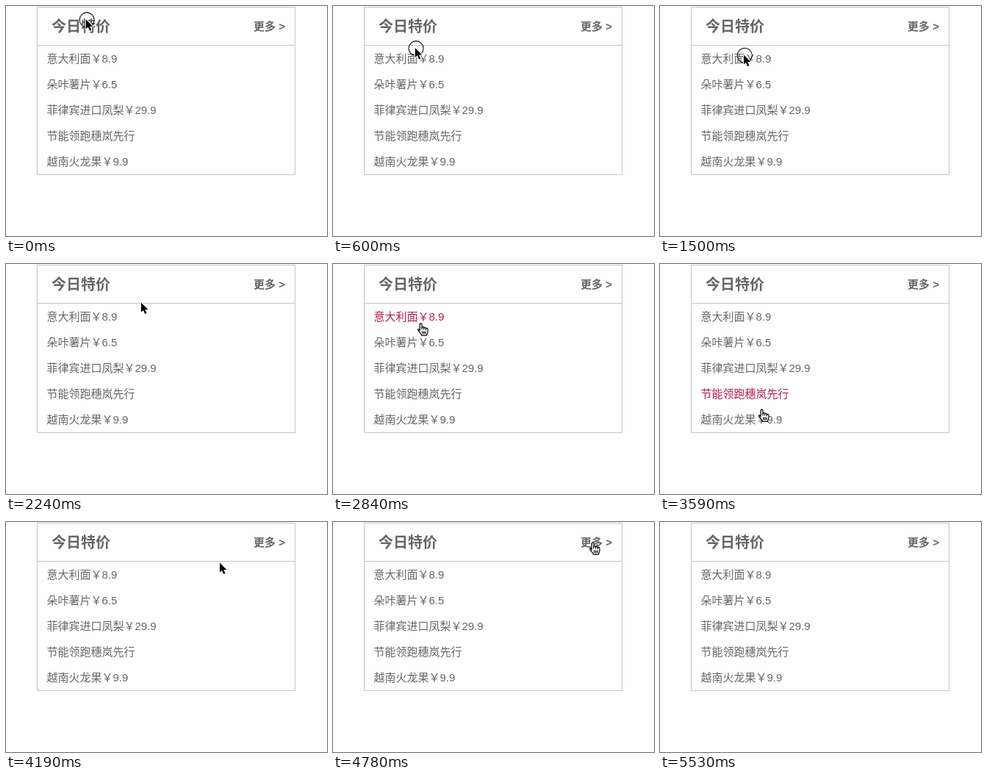
Recreate the animation shown at these times as an HTML page. Size 437x313 px, loop 5.85 s.

```html
<!DOCTYPE html>
<html lang="zh-CN">
<head>
<meta charset="utf-8">
<title>今日特价</title>
<style>
  html, body { margin: 0; width: 100%; height: 100%; overflow: hidden; background: #fefefe; }
  svg { display: block; }
  text { font: 15px "Liberation Sans", "Noto Sans CJK SC", "Noto Sans CJK", sans-serif; fill: #666; }
  .title { font-size: 20px; font-weight: 700; }
  .more { font-weight: 700; }
  .active { fill: #b41e4b; }
  .frame { fill: none; stroke: #c6c6c6; shape-rendering: crispEdges; }
  #arrow path { fill: #000; stroke: #fff; stroke-width: 2; stroke-linejoin: round; paint-order: stroke; }
  #hand path { fill: #fff; stroke: #000; stroke-width: 1.2; stroke-linejoin: round; stroke-linecap: round; }
  #ring { fill: none; stroke: #111; stroke-width: 1.1; }
</style>
</head>
<body>
<svg width="437" height="313" viewBox="0 0 437 313">
  <path class="frame" d="M42.5 1.5H393.5V229.5H42.5ZM42.5 53.5H393.5"/>
  <text class="title" x="62" y="35">今日特价</text>
  <text class="more" x="337" y="33">更多 &gt;</text>
  <g id="rows"></g>
  <g id="cursor">
    <circle id="ring" cx="2.3" cy="2.2" r="10"/>
    <g id="arrow"><path d="M1 1.5V14.6L4 11.9L6.2 17L8.5 16L6.3 11.1H10.4Z"/></g>
    <g id="hand">
      <path d="M4.2 10.6V2.4C4.2 .3 7 .3 7 2.4V6.6C7.4 5.3 9.6 5.4 9.7 7C10.3 5.9 12.3 6.2 12.4 7.7C13.1 6.9 15 7.3 15 9V12C15 14 13.7 14.8 13.5 17.2H6.6C6.3 15.2 3.7 13.2 2.2 10.9C.6 8.6 2.6 7.5 4.2 10.6Z"/>
      <path d="M7 6.6V8.8M9.7 7V9M12.4 7.7V9.4M7.7 11.8V14.8M9.8 11.8V14.8M11.9 11.8V14.8"/>
    </g>
  </g>
</svg>
<script>
const LOOP = 5850;
const items = ["意大利面￥8.9", "朵咔薯片￥6.5", "菲律宾进口凤梨￥29.9", "节能领跑穗岚先行", "越南火龙果￥9.9"];
const byId = id => document.getElementById(id);

const rows = items.map((label, i) => {
  const row = document.createElementNS("http://www.w3.org/2000/svg", "text");
  row.setAttribute("x", 55.5);
  row.setAttribute("y", 77 + 35 * i);
  row.textContent = label;
  byId("rows").append(row);
  return row;
});

// Initial glide with the click ring: seven poses, 150 ms apart.
const glide = Array.from({ length: 7 }, (_, i) => {
  const p = i / 6;
  return [150 * i, 107.8 + 4.5 * p, 16.7 + 52.3 * p * p * (3 - 2 * p), "ring"];
});

// [start, x, y, pointer, highlighted row]
const poses = [
  ...glide,
  [1500, 113, 65, "ring"],
  [1640, 150, 60, "arrow"],
  [1790, 184, 53, "arrow"],
  [2090, 185, 52, "arrow"],
  [2240, 183, 51, "arrow"],
  [2390, 168, 43, "arrow"],
  [2540, 142, 47, "arrow"],
  [2690, 122, 63, "hand", 0],
  [2840, 114, 80, "hand", 0],
  [2990, 116, 106, "hand", 1],
  [3140, 121, 133, "hand", 2],
  [3290, 126, 157, "hand", 2],
  [3440, 130, 178, "hand", 3],
  [3590, 133, 197, "hand", 3],
  [3740, 140, 213, "hand", 4],
  [3890, 205, 190, "arrow"],
  [4040, 266, 150, "arrow"],
  [4190, 290, 54, "arrow"],
  [4340, 313, 30, "arrow"],
  [4490, 334, 12, "arrow"],
  [4640, 346, 19, "hand"],
  [4780, 348, 27, "hand"],
  [5080, 352, 52, "arrow"],
  [5230, 366, 140, "arrow"],
  [5380, 404, 294, "arrow"],
  [5530, 437, 313, "none"]
];

const show = (id, visible) => byId(id).style.display = visible ? "" : "none";

function draw() {
  const time = performance.now() % LOOP;
  const [, x, y, pointer, active] = poses.findLast(pose => pose[0] <= time);
  byId("cursor").setAttribute("transform", `translate(${x} ${y})`);
  show("ring", pointer === "ring");
  show("arrow", pointer === "ring" || pointer === "arrow");
  show("hand", pointer === "hand");
  rows.forEach((row, i) => row.classList.toggle("active", i === active));
  requestAnimationFrame(draw);
}
draw();
</script>
</body>
</html>
```
